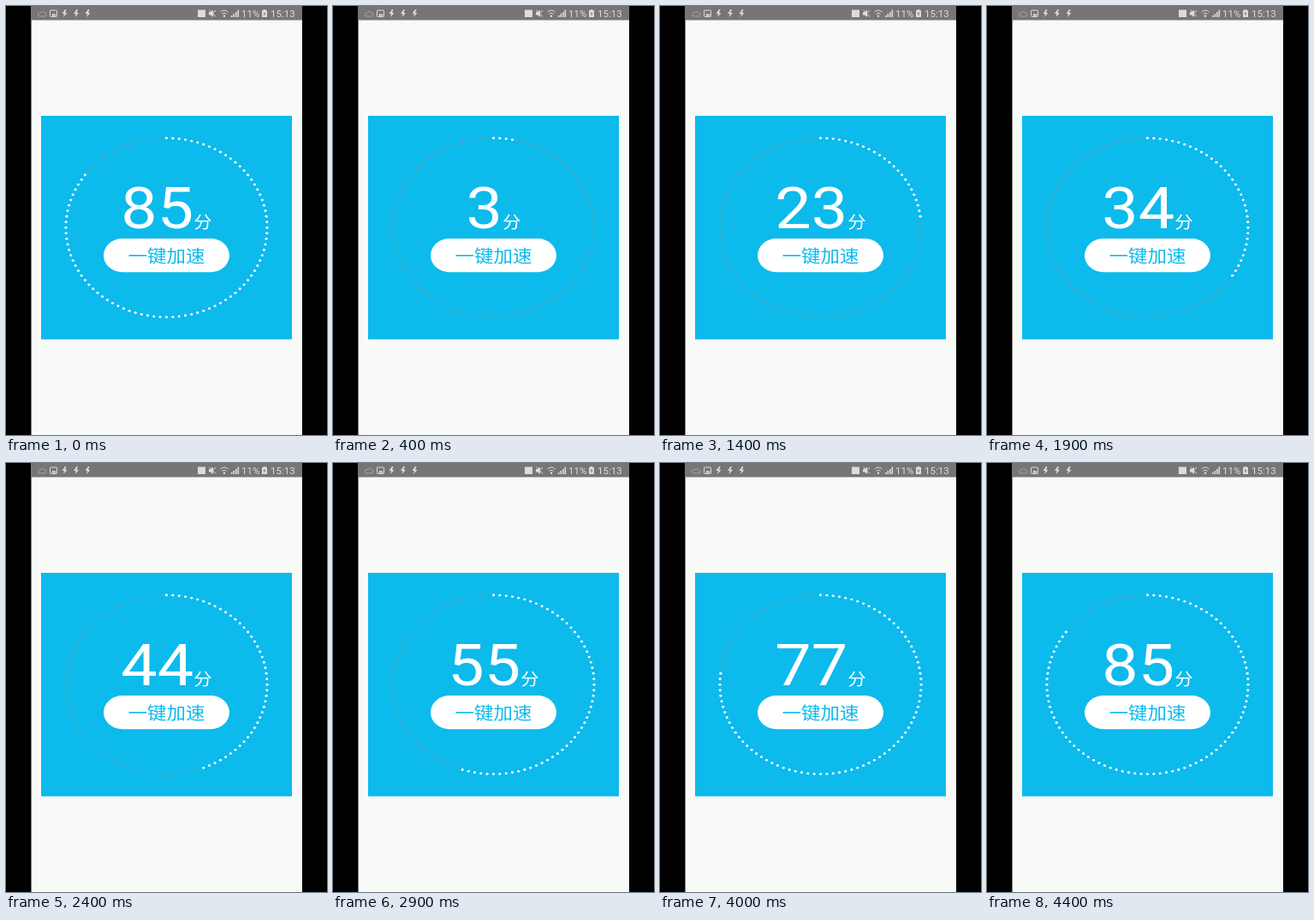
Animation, 375 px wide and 500 px high, one loop 4.5 s. Source, as an HTML page:

```html
<!DOCTYPE html>
<html lang="zh-CN">
<head>
<meta charset="utf-8">
<title>一键加速</title>
<style>
  html, body { margin: 0; width: 100%; height: 100%; overflow: hidden; background: #000; }
  svg { display: block; width: 100vw; height: 100vh; }
  text { font-family: Roboto, "Noto Sans CJK SC", "Noto Sans CJK", sans-serif; }
  .status { fill: #dcdcda; stroke: none; }
  .line { fill: none; stroke: #dcdcda; stroke-width: 1; }
  .status text { font-size: 11.5px; }
  .score { font-size: 67px; fill: #fff; text-anchor: middle; }
  .unit { font-size: 19px; }
  .label { font-size: 20px; fill: #0cbaec; text-anchor: middle; }
</style>
</head>
<body>
<svg viewBox="0 0 375 500">
  <rect width="375" height="500" fill="#000"/>
  <rect x="29.5" width="316.5" height="500" fill="#f8faf7"/>
  <rect x="29.5" width="316.5" height="16.5" fill="#777674"/>

  <g class="status">
    <path class="line" opacity=".45" d="M39 12h6a2 2 0 0 0 0-4a3 3 0 0 0-5 0a2 2 0 0 0-1 4z"/>
    <rect class="line" x="51.5" y="5" width="8" height="7.5" rx="1"/>
    <path d="M53 11.5l2-3 1.500 1.500 1-1 1.500 2.500z"/>
    <g id="bolts"></g>
    <rect x="224" y="4.500" width="9" height="8.500"/>
    <path d="M237 7h2l3-2.500v8.500l-3-2.500h-2z"/>
    <path class="line" d="M237.500 4.500l7.500 8M245 5l-2.500 3"/>
    <path class="line" d="M250.500 7q4.500-4 9 0M252.500 9.300q2.500-2.200 5 0"/>
    <circle cx="255" cy="11.700" r="1.200"/>
    <path d="M263 13v-2h1.600v2zM265.500 13v-4h1.600v4zM268 13v-6h1.600v6zM270.500 13v-8.500h1.600v8.500z"/>
    <text x="275" y="12.700">11%</text>
    <path d="M300.700 4h2.600v1h1.700v8h-6v-8h1.700z"/>
    <path d="M302.500 6l-2 3.500h1.500l-.5 2.500 2-3.500h-1.500z" fill="#777674"/>
    <text x="309" y="12.700">15:13</text>
  </g>

  <rect x="41" y="128" width="293" height="260.500" fill="#0cbaec"/>
  <!-- The card shows a square design at a 1.127 : 1 pixel aspect. -->
  <g transform="translate(187.5 258.3) scale(1.127 1)">
    <g id="ring"></g>
    <text class="score" y=".7"><tspan id="value">85</tspan><tspan class="unit">分</tspan></text>
    <rect x="-65.200" y="12.700" width="130.400" height="39.300" rx="19.650" fill="#fff"/>
    <text class="label" y="40.400">一键加速</text>
  </g>
</svg>
<script>
  const LOOP = 4500, STEP = 100, DOTS = 100, RADIUS = 104.3;
  const knots = [[200, -1], [800, 11], [1400, 23], [2400, 44], [2900, 55], [3600, 69], [4400, 85]];
  const byId = id => document.getElementById(id);

  function add(parent, tag, attrs) {
    const el = document.createElementNS(parent.namespaceURI, tag);
    for (const key in attrs) el.setAttribute(key, attrs[key]);
    return parent.appendChild(el);
  }

  for (const x of [69, 82.5, 96]) {
    add(byId('bolts'), 'path', { d: `M${x} 4l-3.500 5h2.500l-1 4 4.500-5h-2.500l1.500-4z` });
  }

  const dots = Array.from({ length: DOTS }, (_, i) => {
    const angle = i / DOTS * 2 * Math.PI;
    return add(byId('ring'), 'circle', {
      cx: RADIUS * Math.sin(angle),
      cy: -RADIUS * Math.cos(angle)
    });
  });

  function scoreAt(time) {
    const t = Math.floor(time / STEP) * STEP;
    if (t < knots[0][0]) return 85;
    const next = Math.max(1, knots.findIndex(k => k[0] >= t));
    const [t0, v0] = knots[next - 1], [t1, v1] = knots[next];
    return Math.max(0, Math.round(v0 + (v1 - v0) * (t - t0) / (t1 - t0)));
  }

  let shown = -1;
  function draw() {
    const score = scoreAt(performance.now() % LOOP);
    if (score !== shown) {
      shown = score;
      byId('value').textContent = score;
      dots.forEach((dot, i) => {
        const lit = i <= score;
        dot.setAttribute('r', lit ? 1.4 : 1.1);
        dot.setAttribute('fill', lit ? '#fff' : '#7699a2');
      });
    }
    requestAnimationFrame(draw);
  }
  draw();
</script>
</body>
</html>
```
